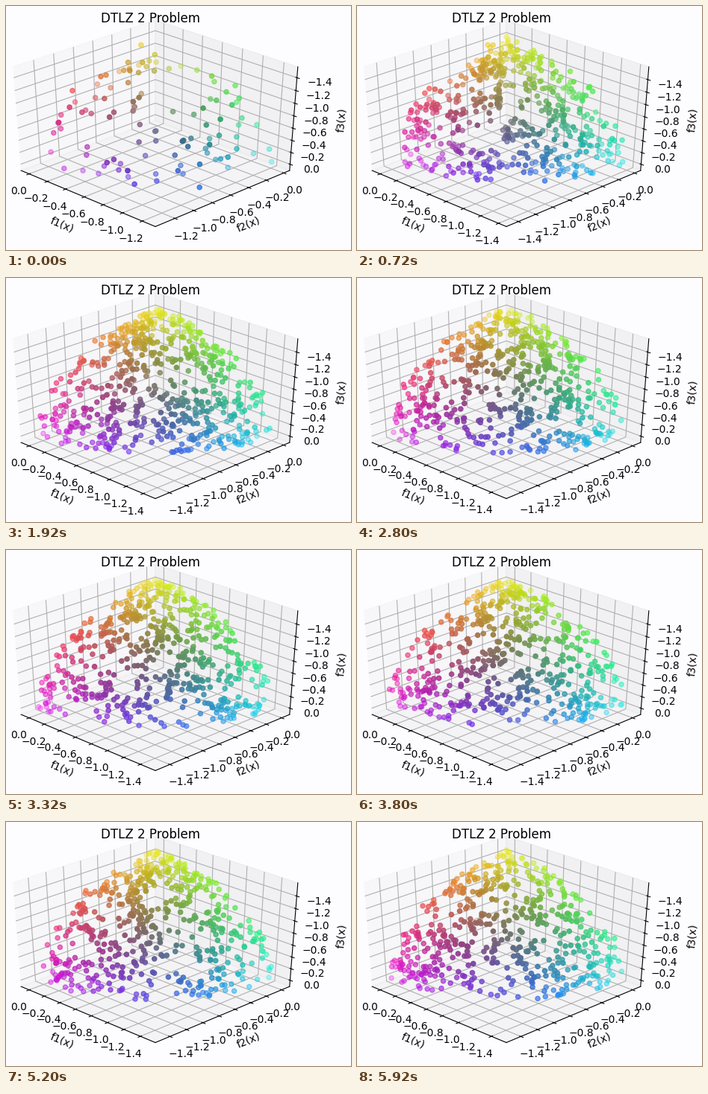
A matplotlib script for the animation above (6 s loop, 462 by 328 pixels).

```python
import numpy as np
import matplotlib.pyplot as plt
from matplotlib.animation import FuncAnimation

WIDTH, HEIGHT, DPI = 462, 328, 100
GENERATIONS = 60
TICK_MS = 40          # generations last three and two ticks in turn

# Largest value per objective, growing over the generations
KNOTS = [0, 2, 6, 13, 25, 28]
PEAKS = [
    [1.24, 1.34, 1.38, 1.42, 1.45, 1.47],
    [1.31, 1.38, 1.43, 1.455, 1.46, 1.465],
    [1.46, 1.48, 1.49, 1.50, 1.50, 1.50],
]
SIZE_KNOTS, SIZES = [0, 3, 8, 13, 25, 59], [105, 330, 560, 650, 540, 510]

plt.rcParams["font.family"] = "DejaVu Sans"


def peaks(gen):
    return np.array([np.interp(gen, KNOTS, p) for p in PEAKS])


def floors(gen):
    """Smallest value per objective."""
    return np.array([0, np.interp(gen, [20, 26], [0.025, 0]), 0])


def new_points(rng, parents, count):
    """Rows of two angles and a depth; half of them are close to a parent."""
    fresh = rng.uniform(0, 1, (count, 3))
    lift = fresh[:, 0]
    fresh[:, 0] = (np.arcsin(lift) + lift * np.pi / 2) / 2
    fresh[:, 1] *= np.pi / 2
    if len(parents):
        near = rng.random(count) < 0.5
        picks = parents[rng.integers(0, len(parents), count)]
        jitter = rng.normal(0, 0.045, (count, 2))
        angles = np.clip(picks[:, :2] + jitter, 0, np.pi / 2)
        fresh[near, :2] = angles[near]
    return fresh


def evolve():
    rng = np.random.default_rng(7)
    pop = np.empty((0, 3))
    history = []
    for gen in range(GENERATIONS):
        size = int(np.interp(gen, SIZE_KNOTS, SIZES))
        keep = rng.permutation(len(pop))[:int(0.78 * size)]
        pop = pop[keep]
        pop = np.vstack([pop, new_points(rng, pop, size - len(pop))])
        history.append(pop)
    return history


def objectives(pop, gen):
    """Place the population on the octant of a sphere."""
    a, b, depth = pop.T
    top = np.interp(gen, [0, 13, 28], [1.43, 1.46, 1.48])
    spread = np.interp(gen, [0, 13, 28], [0.2, 0.12, 0.04])
    r = top * (1 - spread * depth)
    f = np.stack([r * np.cos(a) * np.cos(b),
                  r * np.cos(a) * np.sin(b),
                  r * np.sin(a)], axis=1)
    return np.clip(f, floors(gen), peaks(gen))


def shades(f, gen):
    """Colour by objective values; points farther from the eye are fainter."""
    near = f.sum(axis=1)
    near = (near - near.min()) / np.ptp(near)
    rgb = 0.94 - 0.88 * f / peaks(gen)
    return np.column_stack([rgb, 0.3 + 0.7 * near])


history = evolve()

fig = plt.figure(figsize=(WIDTH / DPI, HEIGHT / DPI), dpi=DPI, facecolor="#fdfcff")
ax = fig.add_axes([-38.8 / WIDTH, 19.4 / HEIGHT, 465 / WIDTH, 302 / HEIGHT],
                  projection="3d", facecolor="none")
ax.apply_aspect = lambda position=None: None   # let the cube fill a wide box
ax.set_box_aspect((1, 1, 1), zoom=0.94675)
ax.view_init(elev=-145, azim=45)
ax.set_title("DTLZ 2 Problem", y=1)
ax.set_xlabel("f1(x)")
ax.set_ylabel("f2(x)")
ax.set_zlabel("f3(x)")

cloud = None


def set_limits(gen):
    axes = [(ax.set_xticks, ax.set_xlim), (ax.set_yticks, ax.set_ylim),
            (ax.set_zticks, ax.set_zlim)]
    for (set_ticks, set_lim), low, high in zip(axes, floors(gen), peaks(gen)):
        pad = (0.05 + 1.1 / 48) * (high - low)
        set_ticks(-np.arange(0, 1.05 * high, 0.2))
        set_lim(-high - pad, pad - low)


def update(tick):
    global cloud
    gen = 2 * (tick // 5) + (tick % 5 >= 3)
    if cloud is not None:
        cloud.remove()
    set_limits(gen)
    f = objectives(history[gen], gen)
    cloud = ax.scatter(*(-f.T), c=shades(f, gen), s=20, depthshade=False)
    return [cloud]


anim = FuncAnimation(fig, update, frames=GENERATIONS * 5 // 2, interval=TICK_MS,
                     init_func=lambda: [], repeat=True, repeat_delay=0, blit=False)
plt.show()
```
